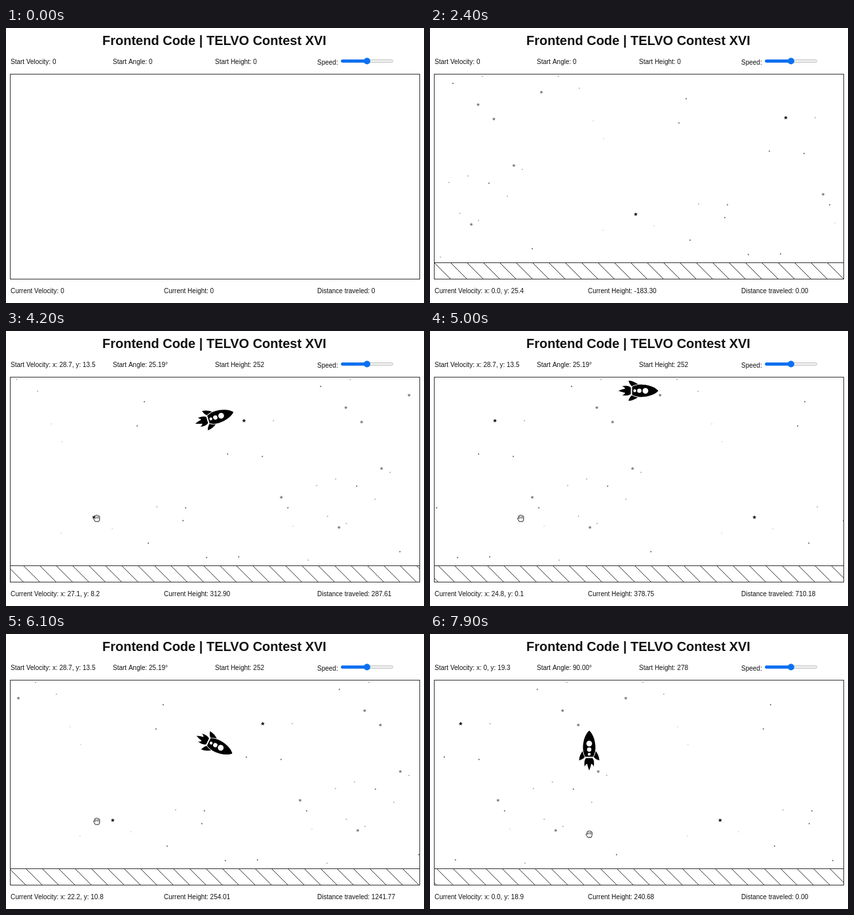
An HTML page with a canvas for the animation above (8000 ms loop, 638 px wide and 420 px high).

```html
<!DOCTYPE html>
<html lang="en">
<head>
<meta charset="utf-8">
<title>Rocket flight</title>
<style>
html, body { margin: 0; width: 100%; height: 100%; overflow: hidden; background: #fff; }
canvas { display: block; width: 638px; height: 420px; }
</style>
</head>
<body>
<canvas id="stage" width="638" height="420"></canvas>
<script>
const ctx = document.getElementById('stage').getContext('2d');
const LOOP = 8000, STEP = 100;
const BOX = { x: 6.5, y: 70.5, w: 625, h: 313 };
const SCALE = 0.625, ZERO_Y = 328, GROUND_Y = 358.5, HATCH = 25;
const FONT = 'Arial, "Liberation Sans", sans-serif';
const TAU = Math.PI * 2;

// x, y pairs, grouped by look
const STARS = [
  { r: 3, alpha: 0.95, at: [543, 137, 314, 284.5] },
  { r: 2.7, alpha: 0.55, at: [73.5, 117, 170, 98, 128, 210, 63, 300, 97.5, 139, 600, 254] },
  { r: 1.4, alpha: 0.7, at: [35, 84.5, 391, 108, 380, 145, 518, 188, 571, 191.5, 90, 237, 156, 337,
    454, 270, 450, 289.5, 397, 324, 486, 346, 535, 345, 610, 270] },
  { r: 1.3, alpha: 0.4, at: [80, 74, 196, 74, 228, 92, 588, 137, 141, 216, 29, 236, 45.5, 283, 74, 294,
    16, 350, 410, 268.5, 58, 226, 118, 257] },
  { r: 1.2, alpha: 0.22, at: [249, 142, 265, 169, 342, 302, 264, 309, 618, 298] }
];

const rocketBody = new Path2D('M30 0C24-7 12-9.5 4-9.5C-2-9.5-8-7.5-10-6L-10 6C-8 7.5-2 9.5 4 9.5C12 9.5 24 7 30 0Z');
const rocketHull = new Path2D(rocketBody);
for (const [x, r] of [[10.3, 4.4], [1, 3.3], [-6, 2.2]]) {
  rocketHull.moveTo(x + r, 0);
  rocketHull.arc(x, 0, r, 0, TAU);
}
const rocketRear = new Path2D(
  'M0-9Q-7-15-15.5-15.5Q-14-9-9-6Z M0 9Q-7 15-15.5 15.5Q-14 9-9 6Z' +
  'M-12-5C-16-8-20-7.5-25-7Q-20-4.5-21-3Q-25-2.5-31 0Q-25 2.5-21 3Q-20 4.5-25 7C-20 7.5-16 8-12 5Z');
const openHand = new Path2D(
  'M-2.2 5L-4.8 .8Q-5.2-1-3.4-.4L-2.6.4L-3.4-3Q-2.8-4.6-1.8-3.4L-1.4-4.6Q-.2-5.8.4-4.4' +
  'Q1.8-5.4 2.4-3.6Q4-4.2 4.4-2.4L4.4 1Q4 3 3.2 5Z');
const fist = new Path2D('M-2.4 4L-4.2 1.2Q-4.6-.6-3-.6L-3-2.2Q-2.4-3.6-1-3Q.2-4 1.2-3Q2.6-3.6 3.2-2.4Q4.4-2.4 4.4-.8Q4.4 2 3 4Z');

const rad = deg => deg * Math.PI / 180;
const mod = (a, n) => ((a % n) + n) % n;
const toY = h => ZERO_Y - h * SCALE;
const clamp01 = v => Math.min(1, Math.max(0, v));
const speedText = (vx, vy) => `x: ${Math.abs(vx).toFixed(1)}, y: ${Math.abs(vy).toFixed(1)}`;

function fall(t) {
  const s = Math.min(t, 2.4);
  return { vx: 0, vy: -(9.51 * s + 0.673 * s * s), dist: 0,
    h: 388.3 - 20.5 * (4.755 * s * s + 0.2243 * s ** 3) };
}

function arcFlight(t) {
  const s = Math.min(t, 3.585);
  return {
    vx: 28.7 - 3.325 * s + 0.25 * s * s,
    vy: 13.5 - 10.77 * s + 0.262 * s * s,
    dist: 596.687 * s - 45.537 * s * s + 5.2095 * s ** 3,
    h: 202 + 276.61 * s - 110.52 * s * s + 1.79 * s ** 3
  };
}

function climb(t) {
  return { vx: 0, vy: 19.3 - 12 * t, dist: 0, h: 228 + 399.77 * t - 110 * t * t };
}

function dragState(x, h, pull, angle, e) {
  const y = toY(h);
  return { x, y, angle, aim: e > 0 ? [pull[0] * e, pull[1] * e] : null,
    cursor: [x + pull[0] * e, y + pull[1] * e], grab: true };
}

function stateAt(ms) {
  const t = ms / 1000;
  const s = { x: 318.5, scroll: 0, startV: '0', startA: '0', startH: '0' };
  const fly = f => Object.assign(s, {
    y: toY(f.h), angle: Math.atan2(f.vy, f.vx) * 180 / Math.PI,
    v: speedText(f.vx, f.vy), h: f.h.toFixed(2), d: f.dist.toFixed(2)
  });

  if (ms < 100) return Object.assign(s, { empty: true, v: '0', h: '0', d: '0' });
  if (ms < 2700) return fly(fall(t - 0.1));
  if (ms < 3700) {
    const e = 1 - Math.pow(1 - clamp01((ms - 2700) / 900), 1.737);
    fly(fall(2.4));
    Object.assign(s, dragState(318.5, 202, [-180, 84.7], 25.19 - (1 - e) * 1.4, e));
    if (e) s.startA = s.angle.toFixed(2) + '°';
    s.h = '202.00';
    return s;
  }

  const f = arcFlight(t - 3.7);
  s.scroll = f.dist * SCALE;
  Object.assign(s, { startV: 'x: 28.7, y: 13.5', startA: '25.19°', startH: '252' });
  if (ms < 7400) {
    const u = clamp01((ms - 7100) / 300);
    s.cursor = [138.5 + 104.5 * u, 286 - 100 * u];
    return fly(f);
  }
  s.startA = '90.00°';
  if (ms < 7868) {
    const e = 1 - (1 - clamp01((ms - 7400) / 300)) ** 2;
    fly(f);
    Object.assign(s, dragState(243, 228, [0, 120], 90, e));
    s.h = '228.00';
    return s;
  }
  Object.assign(s, { x: 243, startV: 'x: 0, y: 19.3', startH: '278', cursor: [243, 305.5] });
  return fly(climb(t - 7.868));
}

function line(x1, y1, x2, y2) {
  ctx.beginPath();
  ctx.moveTo(x1, y1);
  ctx.lineTo(x2, y2);
  ctx.stroke();
}

function text(str, x, y, font = '10px ') {
  ctx.font = font + FONT;
  ctx.fillStyle = '#111';
  ctx.fillText(str, x, y);
}

function drawStar(x, y, r) {
  ctx.beginPath();
  for (let i = 0; i < 10; i++) {
    const a = i * Math.PI / 5 - Math.PI / 2, q = i % 2 ? r * 0.5 : r;
    ctx.lineTo(x + q * Math.cos(a), y + q * Math.sin(a));
  }
  ctx.fill();
}

function drawSky(scroll) {
  ctx.fillStyle = '#111';
  for (const { r, alpha, at } of STARS) {
    ctx.globalAlpha = alpha;
    for (let i = 0; i < at.length; i += 2) {
      drawStar(BOX.x + mod(at[i] - BOX.x - scroll, BOX.w), at[i + 1], r);
    }
  }
  ctx.globalAlpha = 1;
}

function drawGround(scroll) {
  ctx.strokeStyle = '#333';
  ctx.lineWidth = 1;
  line(BOX.x, GROUND_Y, BOX.x + BOX.w, GROUND_Y);
  for (let x = BOX.x - HATCH - mod(scroll, HATCH); x < BOX.x + BOX.w; x += HATCH) {
    line(x, GROUND_Y, x + HATCH, GROUND_Y + HATCH);
  }
}

function drawAim({ x, y, angle, aim }) {
  ctx.strokeStyle = ctx.fillStyle = '#777';
  ctx.lineWidth = 1;
  const ax = Math.round(x) - 0.5, ay = Math.round(y) - 0.5;
  ctx.setLineDash([1, 1]);
  line(ax, ay, ax, ay - 63);
  ctx.setLineDash([]);
  line(ax, ay, ax + 62, ay);
  for (const k of [-1, 1]) {
    line(ax, ay - 63, ax + 3.5 * k, ay - 57);
    line(ax + 62, ay, ax + 55, ay + 3.5 * k);
  }
  ctx.beginPath();
  ctx.arc(ax, ay, 31, -rad(angle), 0);
  ctx.stroke();

  const [px, py] = aim;
  ctx.setLineDash([4, 3]);
  ctx.strokeStyle = '#888';
  line(x, y, x + px * 0.95, y + py * 0.95);
  ctx.setLineDash([]);

  const len = Math.hypot(px, py) * 0.95;
  ctx.save();
  ctx.translate(x, y);
  ctx.rotate(Math.atan2(-py, -px));
  ctx.strokeStyle = ctx.fillStyle = '#e5524d';
  ctx.lineWidth = 2;
  line(0, 0, Math.max(0, len - 5), 0);
  ctx.beginPath();
  ctx.moveTo(len, 0);
  ctx.lineTo(len - 9, -4);
  ctx.lineTo(len - 7, 0);
  ctx.lineTo(len - 9, 4);
  ctx.fill();
  ctx.restore();
  text(angle.toFixed(2) + '°', x + 10.5, y - 7, '8px ');
}

function drawRocket({ x, y, angle }) {
  ctx.save();
  ctx.translate(x, y);
  ctx.rotate(-rad(angle));
  ctx.fillStyle = '#000';
  ctx.fill(rocketRear);
  ctx.strokeStyle = '#fff';
  ctx.lineWidth = 1.6;
  ctx.stroke(rocketBody);
  ctx.fill(rocketHull, 'evenodd');
  ctx.restore();
}

function drawCursor({ cursor, grab }) {
  const shape = grab ? fist : openHand;
  ctx.save();
  ctx.translate(...cursor);
  ctx.fillStyle = '#fff';
  ctx.strokeStyle = '#222';
  ctx.lineWidth = 1;
  ctx.fill(shape);
  ctx.stroke(shape);
  ctx.lineWidth = 0.7;
  for (const k of [-1, 1, 2.6]) line(k, grab ? -1.5 : -3, k, 0.5);
  ctx.restore();
}

function drawSlider(x, y, w) {
  const bar = (width, fill, edge) => {
    ctx.beginPath();
    ctx.roundRect(x + 0.5, y - 2, width - 1, 4, 2);
    ctx.fillStyle = fill;
    ctx.strokeStyle = edge;
    ctx.lineWidth = 0.8;
    ctx.fill();
    ctx.stroke();
  };
  bar(w, '#efefef', '#b8b8b8');
  bar(w / 2, '#0b70f2', '#0b70f2');
  ctx.fillStyle = '#0b70f2';
  ctx.beginPath();
  ctx.arc(x + w / 2, y, 5, 0, TAU);
  ctx.fill();
}

function draw(s) {
  ctx.fillStyle = '#fff';
  ctx.fillRect(0, 0, 638, 420);

  text('Frontend Code | TELVO Contest XVI', 147, 25.5, 'bold 20px ');
  text('Start Velocity: ' + s.startV, 7, 54.5);
  text('Start Angle: ' + s.startA, 163, 54.5);
  text('Start Height: ' + s.startH, 319, 54.5);
  text('Speed:', 475, 55.5);
  drawSlider(511, 50.5, 80);

  if (!s.empty) {
    ctx.save();
    ctx.beginPath();
    ctx.rect(BOX.x, BOX.y, BOX.w, BOX.h);
    ctx.clip();
    drawSky(s.scroll);
    drawGround(s.scroll);
    if (s.aim) drawAim(s);
    drawRocket(s);
    ctx.restore();
  }
  ctx.strokeStyle = '#333';
  ctx.lineWidth = 1;
  ctx.strokeRect(BOX.x, BOX.y, BOX.w, BOX.h);

  text('Current Velocity: ' + s.v, 7, 405);
  text('Current Height: ' + s.h, 241, 405);
  text('Distance traveled: ' + s.d, 475, 405);
  if (s.cursor) drawCursor(s);
}

const begin = performance.now();
function tick() {
  const ms = (performance.now() - begin) % LOOP;
  draw(stateAt(Math.floor(ms / STEP) * STEP));
  requestAnimationFrame(tick);
}
tick();
</script>
</body>
</html>
```
